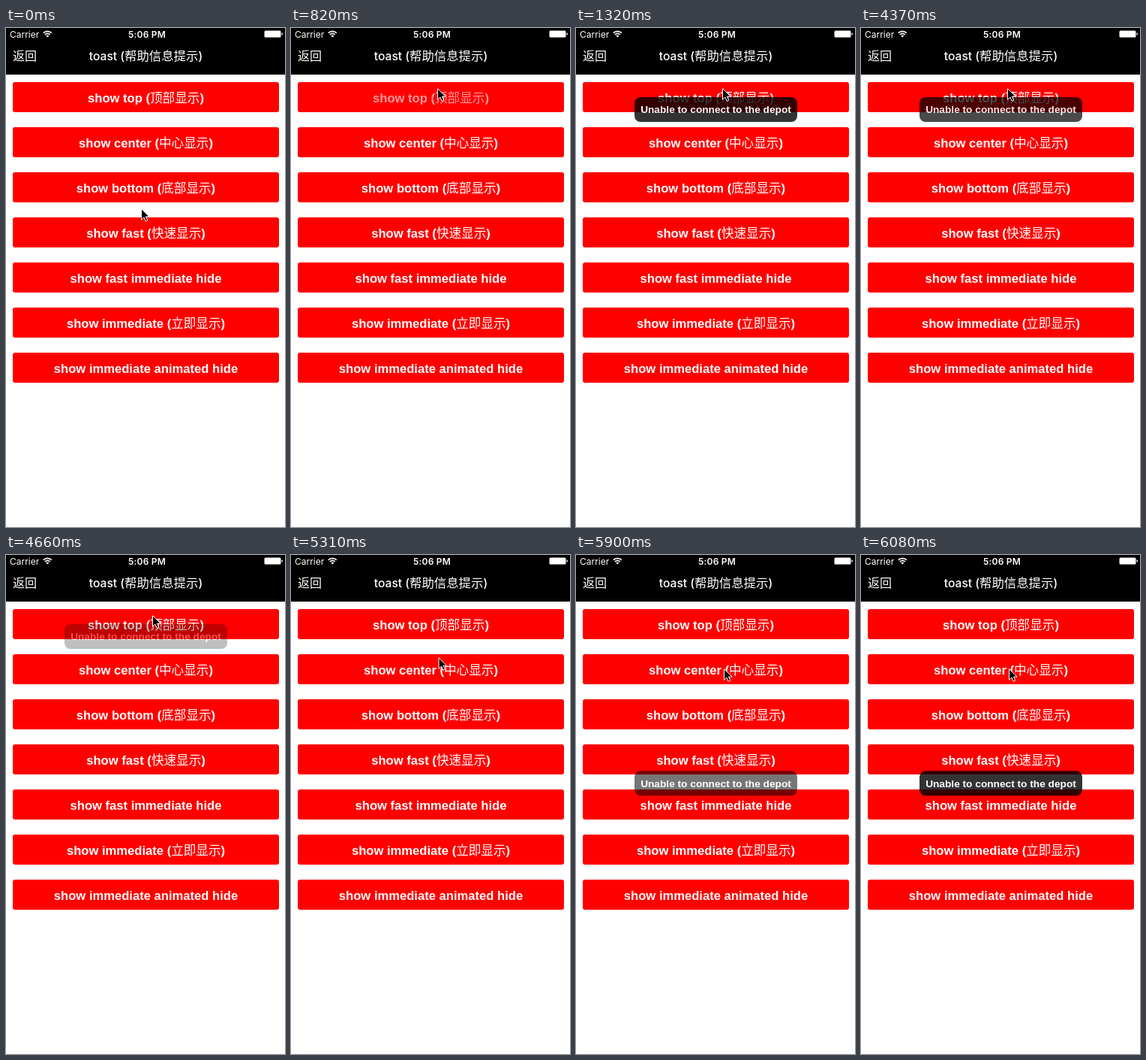
These frames come from a looping animation (372x664 px, 8000 ms). An HTML page:

```html
<!DOCTYPE html>
<html lang="zh-CN">
<head>
<meta charset="utf-8">
<title>Toast demo</title>
<style>
html, body { margin: 0; width: 100%; height: 100%; overflow: hidden; background: #fff; }
svg { display: block; width: 100%; height: 100%; }
text { fill: #fff; white-space: pre; }
.bar { font-family: Inter, "Noto Sans CJK SC", "Noto Sans CJK", sans-serif; }
.label { font: bold 16.6px "Liberation Sans", "Noto Sans CJK SC", "Noto Sans CJK", sans-serif; text-anchor: middle; }
.toast { font: bold 13.7px "Liberation Sans", sans-serif; text-anchor: middle; }
.cjk { font-family: "Noto Sans CJK SC", "Noto Sans CJK", sans-serif; font-weight: 500; }
</style>
</head>
<body>
<svg viewBox="0 0 372 664">
  <rect width="372" height="62"/>
  <g class="bar">
    <text x="5" y="12.5" font-size="12">Carrier</text>
    <text x="188" y="12.5" font-size="12" font-weight="600" letter-spacing=".2" text-anchor="middle">5:06 PM</text>
    <text x="9" y="42.5" font-size="16">返回</text>
    <text x="186.5" y="42.5" font-size="15.6" font-weight="500" text-anchor="middle">toast (<tspan class="cjk" font-size="16.4">帮助信息提示</tspan>)</text>
  </g>
  <g fill="none" stroke="#fff" stroke-width="1.7">
    <path d="M49.8 6.6a7.8 7.8 0 0 1 11 0M51.9 8.8a4.8 4.8 0 0 1 6.8 0"/>
    <path d="M55.3 12.6l-2-2.1a2.8 2.8 0 0 1 4 0z" fill="#fff" stroke="none"/>
  </g>
  <rect x="344.5" y="3.5" width="22" height="9" rx="1.5" fill="#fff"/>
  <path d="M367.5 6.3q1.5 .3 1.5 1.7t-1.5 1.7z" fill="#fff"/>
  <g id="buttons"></g>
  <g id="toast">
    <rect width="217" height="33" rx="8" fill-opacity=".8"/>
    <text class="toast" x="108.5" y="21.3">Unable to connect to the depot</text>
  </g>
  <path id="cursor" d="M.5 .7V15.2L3.9 12 6.2 17.2 8.7 16.1 6.4 11.1H11z" stroke="#fff"/>
</svg>
<script>
const LOOP = 8000;
const byId = id => document.getElementById(id);
const clamp = v => Math.min(1, Math.max(0, v));
const progress = (t, start, end) => clamp((t - start) / (end - start));
const smooth = p => p * p * (3 - 2 * p);

const captions = [
  ["show top", "顶部显示"], ["show center", "中心显示"], ["show bottom", "底部显示"],
  ["show fast", "快速显示"], ["show fast immediate hide"],
  ["show immediate", "立即显示"], ["show immediate animated hide"]
];
byId("buttons").innerHTML = captions.map(([name, note], i) => `
  <g transform="translate(9 ${72 + 60 * i})">
    <rect width="355" height="40" rx="3" fill="#f00"/>
    <text class="label" x="177.5" y="26.5">${name}${note ? ` (<tspan class="cjk">${note}</tspan>)` : ""}</text>
  </g>`).join("");
const labels = document.querySelectorAll(".label");

// A pressed label dims at once, then recovers quickly.
const pressOpacity = (t, down) => t < down ? 1 : 0.6 + 0.4 * progress(t, down + 50, down + 110);

function draw(t) {
  const up = smooth(progress(t, 210, 580));
  const down = smooth(progress(t, 5170, 5370));
  byId("cursor").setAttribute("transform",
    `translate(${180 + 15 * up + 2 * down} ${240 - 160 * up + 71 * down})`);

  labels[0].setAttribute("opacity", pressOpacity(t, 820));
  labels[1].setAttribute("opacity", pressOpacity(t, 5610));

  const centered = t > 5200;
  const opacity = centered
    ? progress(t, 5565, 6065)
    : progress(t, 840, 1320) - progress(t, 4315, 4815);
  byId("toast").setAttribute("transform", `translate(78 ${centered ? 287.3 : 92})`);
  byId("toast").setAttribute("opacity", opacity);
}

function tick(now) {
  draw(now % LOOP);
  requestAnimationFrame(tick);
}
draw(0);
requestAnimationFrame(tick);
</script>
</body>
</html>
```
